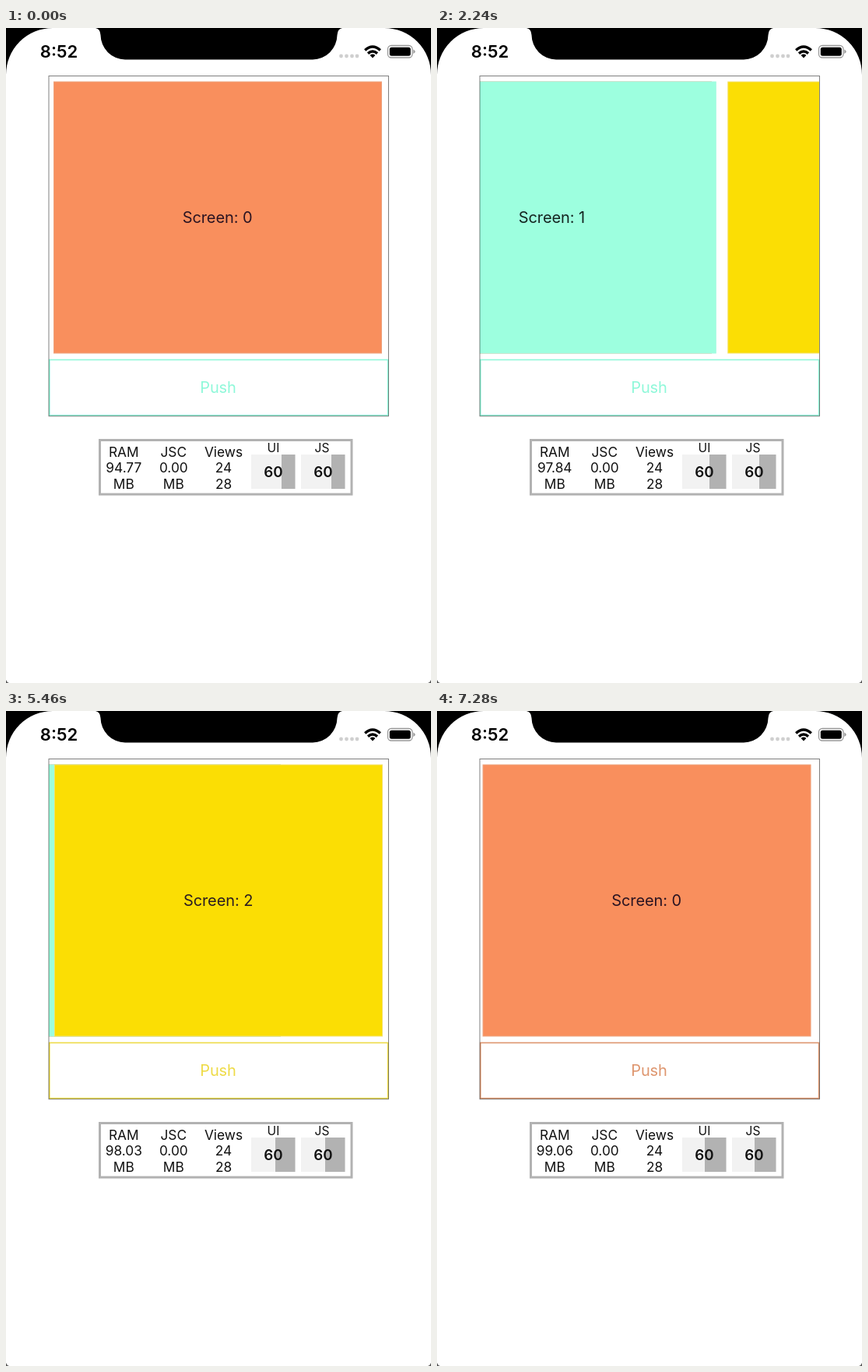
Animation of 546x840 px, one loop 7350 ms. Source, as an HTML page:

```html
<!DOCTYPE html>
<html lang="en">
<head>
<meta charset="utf-8">
<title>Stack navigation</title>
<style>
  html, body { margin: 0; width: 100%; height: 100%; overflow: hidden; background: #fff; }
  svg { display: block; width: 546px; height: 840px; font-family: Inter, "Liberation Sans", sans-serif; }
  text { text-anchor: middle; }
  .label { font-size: 20px; letter-spacing: -.1px; }
  .stats { font-size: 17.3px; fill: #111; }
  .fps { font-size: 18.8px; font-weight: 600; fill: #111; }
  .cap { font-size: 15.6px; fill: #111; }
</style>
</head>
<body>
<svg viewBox="0 0 546 840">
  <defs><clipPath id="frame"><rect x="55" y="62" width="436" height="363"/></clipPath></defs>
  <rect width="546" height="840" fill="#fff"/>

  <!-- phone bezel and notch -->
  <path d="M0 0H60A60 60 0 0 0 0 60ZM546 0H486A60 60 0 0 1 546 60Z"/>
  <path d="M115 0Q121 1 121.5 9A32 32 0 0 0 153 40.5H394A32 32 0 0 0 425.5 9Q426 1 432 0Z"/>
  <path d="M0 836Q1 839 4 840H0ZM546 836Q545 839 542 840H546Z" fill="#555"/>

  <!-- status bar -->
  <text x="68" y="38" font-size="22" font-weight="600">8:52</text>
  <g fill="#cfcfcf">
    <circle cx="430.5" cy="36" r="2.4"/><circle cx="437.5" cy="36" r="2.4"/>
    <circle cx="444.5" cy="36" r="2.4"/><circle cx="451" cy="36" r="2.4"/>
  </g>
  <g fill="none" stroke="#000" stroke-width="3.4">
    <path d="M461.2 28.4Q471 19.6 480.8 28.4"/>
    <path d="M465 32.6Q471 27.4 477 32.6"/>
  </g>
  <path d="M471 38.4L467.6 35Q471 32.2 474.4 35Z"/>
  <rect x="490.5" y="22.5" width="31.5" height="15.5" rx="4.5" fill="none" stroke="#999" stroke-width="1.3"/>
  <rect x="492.8" y="24.8" width="27" height="11" rx="2.5"/>
  <path d="M523.3 27.5Q525.6 28.5 525.6 30.3T523.3 33Z" fill="#999"/>

  <g id="stack" clip-path="url(#frame)"></g>

  <rect id="edge" x="55.8" y="425.5" width="434.8" height="71.2" fill="none" stroke-width="1.6"/>
  <text id="push" class="label" x="272.5" y="468">Push</text>
  <rect x="55" y="61.5" width="436.5" height="436.2" fill="none" stroke="#000" stroke-opacity=".5"/>

  <!-- performance monitor -->
  <rect x="120.5" y="528.5" width="323.5" height="69.5" fill="#fff" stroke="#b2b2b2" stroke-width="3"/>
  <g id="monitor"></g>
</svg>
<script>
const LOOP = 7350, W = 436.5, PARALLAX = 0.3;
const screenColors = ['#f98f5d', '#9dffdf', '#fbde04'];
const edgeColors = ['#eda27c', '#a4fae0', '#f4e16a'];
const buttonColors = ['#de966f', '#8ff8d9', '#eedb48'];
const labelColors = ['#2b1422', '#14241f', '#2b1d22'];

// start, screen, +1 push / -1 pop, duration
const moves = [
  [0, 1, 1, 480], [497, 2, 1, 480],
  [990, 2, -1, 500], [1500, 2, 1, 480], [2020, 2, -1, 1000],
  [3300, 2, 1, 480], [4270, 2, -1, 640],
  [4930, 2, 1, 480], [5481, 2, -1, 1000], [6661, 1, -1, 1000]
];
const memory = [[0, '94.77'], [1400, '97.84'], [2700, '97.21'], [3600, '97.70'], [5000, '98.03'], [6600, '99.06']];
const graph = [[0, 354], [500, 352.5], [2000, 350], [3500, 348.5], [5000, 346], [6500, 344]];

const $ = id => document.getElementById(id);
function add(parent, tag, attrs, text) {
  const el = document.createElementNS('http://www.w3.org/2000/svg', tag);
  for (const k in attrs) el.setAttribute(k, attrs[k]);
  if (text) el.textContent = text;
  parent.appendChild(el);
  return el;
}
const at = (table, t) => table.filter(row => row[0] <= t).pop()[1];

const screens = screenColors.map((fill, i) => {
  const g = add($('stack'), 'g', {});
  add(g, 'rect', { x: 62.5, y: 69, width: 421, height: 348, fill, stroke: edgeColors[i] });
  add(g, 'text', { class: 'label', x: 272.6, y: 250, fill: labelColors[i] }, 'Screen: ' + i);
  return g;
});

const monitor = $('monitor');
const column = (x, lines) => lines.map((s, i) =>
  add(monitor, 'text', { class: 'stats', x, y: 549.5 + i * 20.5 }, s));
const ram = column(151.3, ['RAM', '94.77', 'MB'])[1];
column(215.3, ['JSC', '0.00', 'MB']);
column(279.5, ['Views', '24', '28']);
const bars = [['UI', 0], ['JS', 64]].map(([name, dx]) => {
  add(monitor, 'text', { class: 'cap', x: dx ? 406 : 343.5, y: 544 }, name);
  add(monitor, 'rect', { x: 315 + dx, y: 547, width: 56.5, height: 44, fill: '#f2f2f2' });
  const bar = add(monitor, 'rect', { y: 547, height: 44, fill: '#b2b2b2' });
  add(monitor, 'text', { class: 'fps', x: 343.5 + dx, y: 576 }, '60');
  return { bar, dx };
});

function draw(t) {
  const x = [0, W, W];
  let top = 0;
  for (const [start, n, dir, dur] of moves) {
    if (t < start) break;
    const left = 1 - Math.min(1, (t - start) / dur);
    if (dir > 0) {
      const p = 1 - left ** 3;
      x[n] = W * (1 - p);
      x[n - 1] = -W * PARALLAX * Math.min(1, p / 0.8);
      top = n;
    } else {
      const rest = left ** 5;
      x[n] = W * (1 - rest);
      x[n - 1] = -W * rest;
      top = n - 1;
    }
  }
  screens.forEach((g, i) => g.setAttribute('transform', `translate(${x[i].toFixed(2)} 0)`));
  $('edge').setAttribute('stroke', buttonColors[top]);
  $('push').setAttribute('fill', buttonColors[top]);
  ram.textContent = at(memory, t);
  const gx = at(graph, t);
  for (const { bar, dx } of bars) {
    bar.setAttribute('x', gx + dx);
    bar.setAttribute('width', 371.5 - gx);
  }
}

const begin = performance.now();
function tick() {
  draw((performance.now() - begin) % LOOP);
  requestAnimationFrame(tick);
}
draw(0);
requestAnimationFrame(tick);
</script>
</body>
</html>
```
